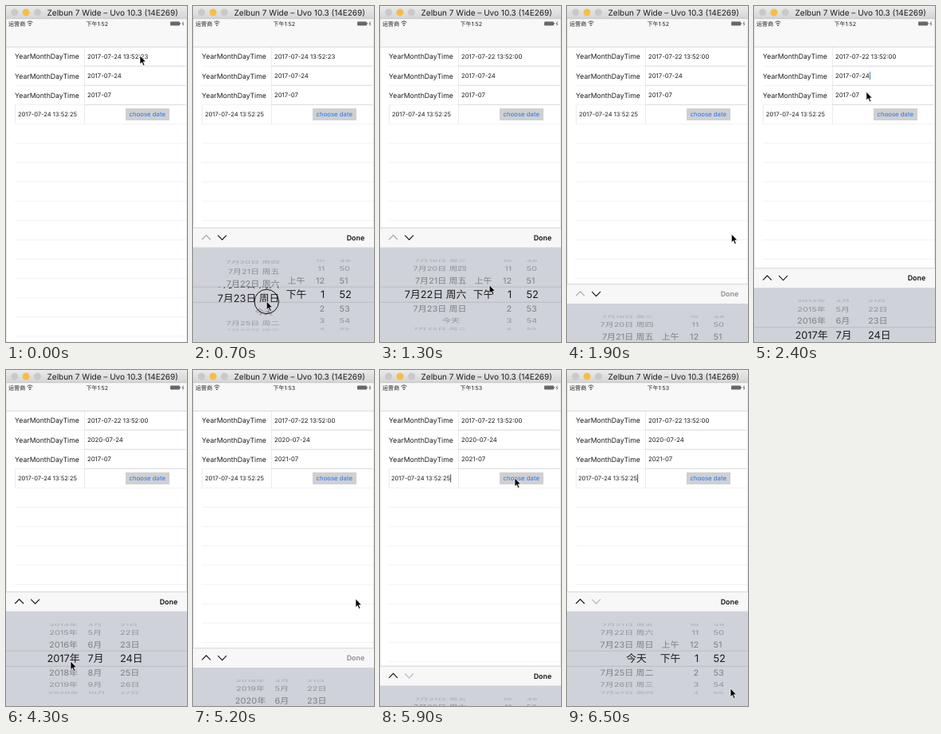
Recreate the animation shown at these times as an HTML page. Size 227 by 420 pixels, loop 6.6 s.

```html
<!DOCTYPE html>
<html lang="zh-CN">
<head>
<meta charset="utf-8">
<title>Date picker</title>
<style>
html, body { margin: 0; width: 100%; height: 100%; overflow: hidden; background: #fff; }
svg { display: block; width: 100vw; height: 100vh; }
text {
  font-family: Inter, "Noto Sans CJK SC", "Noto Sans CJK", sans-serif;
  fill: #1c1c1e; text-rendering: geometricPrecision; white-space: pre;
}
</style>
</head>
<body>
<svg id="stage" viewBox="0 0 227 420">
  <defs>
    <linearGradient id="bar" x2="0" y2="1">
      <stop stop-color="#ebebeb"/><stop offset="1" stop-color="#d4d4d4"/>
    </linearGradient>
    <clipPath id="band"><rect y="351" width="227" height="19.5"/></clipPath>
    <clipPath id="rest">
      <rect y="302" width="227" height="49"/><rect y="370.5" width="227" height="50"/>
    </clipPath>
  </defs>
</svg>
<script>
const LOOP = 6600, STEP = 100, ROW = 24.13, TOP = 51;
const MID = 360.7, RADIUS = 46, PITCH = Math.PI / 8, PANEL = 143;
const stage = document.getElementById('stage');

function add(parent, tag, attrs = {}) {
  const el = document.createElementNS('http://www.w3.org/2000/svg', tag);
  for (const k in attrs) el.setAttribute(k, attrs[k]);
  parent.append(el);
  return el;
}
// Text centred vertically on y by its cap height
function label(parent, str, x, y, size, attrs = {}) {
  const el = add(parent, 'text', { x, y, dy: '.364em', 'font-size': size, ...attrs });
  el.textContent = str;
  return el;
}
const rect = (p, x, y, width, height, fill, more) => add(p, 'rect', { x, y, width, height, fill, ...more });
const path = (p, d, stroke, width = 1) => add(p, 'path', { d, stroke, 'stroke-width': width, fill: 'none' });
const setText = (el, s) => { if (el.textContent !== s) el.textContent = s; };
const show = (el, on) => el.setAttribute('visibility', on ? 'visible' : 'hidden');

// Table
rect(stage, 0, 0, 227, 420, '#fff');
for (let i = 1; i < 16; i++) path(stage, `M11 ${TOP + i * ROW}H227`, '#efeff0', .8);
for (let i = 1; i < 4; i++) path(stage, `M98 ${TOP + i * ROW}H225`, '#d6d6d8', .8);
path(stage, 'M98.5 51V147.5M11.5 124V147.5', '#e6e6e8', .8);
const rowY = i => TOP + (i + .5) * ROW;
for (let i = 0; i < 3; i++) label(stage, 'YearMonthDayTime', 11, rowY(i) + .2, 8.7);
const fields = [0, 1, 2].map(i => label(stage, '', 102, rowY(i), 7.75));
fields.push(label(stage, '2017-07-24 13:52:25', 15, rowY(3), 7.55));
rect(stage, 150, 128, 55, 15, '#d0d0d1');
label(stage, 'choose date', 177.3, 135.4, 7.8, { 'text-anchor': 'middle', style: 'fill:#2877f5' });
const caret = rect(stage, 0, 0, .9, 10, '#3b69e8');

// Navigation and status bars
rect(stage, 0, 16, 227, 35, '#f8f8f8');
path(stage, 'M0 51.2H227', '#c6c6c8', .7);
label(stage, '运营商', 3, 22, 7.1);
path(stage, 'M26.6 20.6Q30 17.4 33.4 20.6M27.9 22.3Q30 20.3 32.1 22.3', '#222', .9);
path(stage, 'M29.2 23.8L30 24.7L30.8 23.8Z', '#222', .8);
const clock = label(stage, '', 114.3, 22, 7.1, { 'text-anchor': 'middle' });
rect(stage, 206, 19.4, 12, 5, '#646a68', { rx: 1 });
rect(stage, 218.4, 21, .8, 2, '#646a68');
path(stage, 'M222.4 19.6L221.2 22.2H222.8L221.6 24.6', '#222', .6);

// Window frame and title bar
rect(stage, 0, 0, 227, 16, 'url(#bar)');
path(stage, 'M0 15.8H227', '#bdbdbd', .6);
path(stage, 'M.25 16V420M226.75 16V420', '#c4c4c4', .5);
['#c9c9c9', '#f9bd45', '#c9c9c9'].forEach((fill, i) =>
  add(stage, 'circle', { cx: 10.8 + i * 14.3, cy: 8, r: 4.5, fill }));
label(stage, 'Zelbun 7 Wide – Uvo 10.3 (14E269)', 133.7, 8.2, 10, { 'text-anchor': 'middle' });

// Keyboard panel
const panel = add(stage, 'g');
rect(panel, 0, 277.3, 227, 24.4, '#f7f7f8');
path(panel, 'M0 277.3H227', '#c3c4c7', .7);
const up = path(panel, 'M11.2 292L16.6 286.5L22 292', '#111', 1.1);
const down = path(panel, 'M31.2 286.6L36.6 292.2L42 286.6', '#111', 1.1);
const done = label(panel, 'Done', 215.2, 289.5, 8.9, { 'text-anchor': 'end', 'font-weight': 600 });
rect(panel, 0, 301.6, 227, 119, '#cfd2d9');

// A wheel keeps a pool of rows, dim outside the band, enlarged within it
function wheel(parent, { x, anchor, text, min = -Infinity, max = Infinity }) {
  const pool = (clip, size) => {
    const g = add(parent, 'g', { 'clip-path': `url(#${clip})` });
    return Array.from({ length: 9 }, () => label(g, '', 0, 0, size, { 'text-anchor': anchor }));
  };
  const dim = pool('rest', 11), bright = pool('band', 12.8);
  return pos => {
    const first = Math.round(pos) - 4;
    for (let n = 0; n < 9; n++) {
      const i = first + n, angle = (i - pos) * PITCH;
      const seen = i >= min && i <= max && Math.abs(angle) < 1.5;
      const s = seen ? text(i) : '', dx = s === '今天' ? -8.5 : 0;
      const y = MID + RADIUS * Math.sin(angle), c = Math.max(0, Math.cos(angle));
      setText(dim[n], s);
      dim[n].setAttribute('transform', `translate(${x + dx} ${y}) scale(1 ${c})`);
      dim[n].setAttribute('opacity', .04 + .44 * c);
      setText(bright[n], s);
      bright[n].setAttribute('transform', `translate(${x + dx} ${y})`);
    }
  };
}
const wrap = (i, n) => (i - 1 + n * 9) % n + 1;
const week = '日一二三四五六';
const dayName = d => d === 24 ? '今天' : `7月${d}日 周${week[(d + 5) % 7]}`;

const timeView = add(panel, 'g'), dateView = add(panel, 'g');
const timeWheels = [
  { x: 108.4, anchor: 'end', text: dayName },
  { x: 129.5, anchor: 'middle', text: i => ['上午', '下午'][i], min: 0, max: 1 },
  { x: 165.3, anchor: 'end', text: i => `${wrap(i, 12)}` },
  { x: 183.4, anchor: 'start', text: i => `${i}` }
].map(w => wheel(timeView, w));
const dateWheels = [
  { x: 72, anchor: 'middle', text: i => `${i}年` },
  { x: 102.5, anchor: 'start', text: i => `${wrap(i, 12)}月` },
  { x: 143, anchor: 'start', text: i => `${wrap(i, 31)}日` }
].map(w => wheel(dateView, w));
path(panel, 'M0 351.2H227M0 370.3H227', '#b0b3b9', .7);

// Pointer
const pointer = add(stage, 'g');
const ring = add(pointer, 'circle', { r: 15.2, cy: .5, fill: 'none', stroke: '#111', 'stroke-width': 1 });
add(pointer, 'path', {
  d: 'M0 0V10.6L2.4 8.4L4.1 12.5L5.9 11.7L4.2 7.8H7.4Z',
  fill: '#000', stroke: '#fff', 'stroke-width': .7
});

// Timeline
const sessions = [{ open: 100, close: 1800 }, { open: 2200, close: 5100 }, { open: 5800, close: LOOP }];
const taps = [100, 2200, 3800, 5800];   // focus of each field in turn
const drags = {
  day: { a: 475, b: 860, from: 24, to: 22 },
  year: { a: 2900, b: 3500, from: 2017, to: 2020 },
  month: { a: 4300, b: 4900, from: 2017, to: 2021 }
};
const stops = [
  { at: 0, until: 200, x: 168, y: 62 },
  { at: 500, x: 92.3, y: 348 },
  { at: 900, until: 1000, x: 92.3, y: 390 },
  { at: 1700, until: 2000, x: 206.3, y: 285 },
  { at: 2200, until: 2300, x: 146, y: 86 },
  { at: 2900, x: 77, y: 372 },
  { at: 3500, x: 78, y: 322 },
  { at: 3800, until: 3900, x: 122, y: 110 },
  { at: 4300, x: 81, y: 364 },
  { at: 4900, x: 82, y: 312 },
  { at: 5100, until: 5300, x: 204, y: 286 },
  { at: 5700, until: 5900, x: 169, y: 135 },
  { at: 6500, x: 205, y: 398 }
];

const part = (t, a, b) => Math.min(1, Math.max(0, (t - a) / (b - a)));
const smooth = f => f * f * (3 - 2 * f);
const settle = f => 1 - (1 - f) ** 1.5;
const mix = (a, b, f) => a + (b - a) * f;
const turn = (d, t) => mix(d.from, d.to, smooth(part(t, d.a, d.b)));

function panelOffset(t) {
  const s = sessions.findLast(s => t >= s.open);
  if (!s) return PANEL;
  return PANEL * (1 - settle(part(t, s.open, s.open + 400)) + settle(part(t, s.close, s.close + 275)));
}
function pointerAt(t) {
  const n = stops.findLastIndex(s => t >= s.at);
  const p = stops[n], q = stops[n + 1] || p;
  const f = p === q ? 0 : smooth(part(t, p.until ?? p.at, q.at));
  return `${mix(p.x, q.x, f)} ${mix(p.y, q.y, f)}`;
}

function draw(t) {
  const { day, year, month } = drags;
  setText(clock, t < 5000 ? '下午1:52' : '下午1:53');
  setText(fields[0], t < day.b ? '2017-07-24 13:52:23' : '2017-07-22 13:52:00');
  setText(fields[1], t < year.b ? '2017-07-24' : '2020-07-24');
  setText(fields[2], t < month.b ? '2017-07' : '2021-07');

  const open = sessions.some(s => t >= s.open && t < s.close);
  const last = taps.findLastIndex(tap => t >= tap);
  fields[3].setAttribute('x', last === 3 ? 14 : 15);
  show(caret, open && (t - taps[last] - 100) % 600 < 400);
  if (open) {
    const el = fields[last];
    caret.setAttribute('x', +el.getAttribute('x') + el.getComputedTextLength() + .2);
    caret.setAttribute('y', rowY(last) - 5);
    caret.setAttribute('fill', last === 3 ? '#333' : '#3b69e8');
  }

  panel.setAttribute('transform', `translate(0 ${panelOffset(t)})`);
  up.setAttribute('stroke', last < 1 ? '#a6a6aa' : '#111');
  down.setAttribute('stroke', last === 3 ? '#b4b4b8' : '#111');
  done.style.fill = open ? '#111' : '#8c8c90';

  const dates = last === 1 || last === 2;
  timeView.setAttribute('display', dates ? 'none' : 'inline');
  dateView.setAttribute('display', dates ? 'inline' : 'none');
  if (dates) [turn(last === 1 ? year : month, t), 7, 24].forEach((p, i) => dateWheels[i](p));
  else [last === 3 ? 24 : turn(day, t), 1, 13, 52].forEach((p, i) => timeWheels[i](p));

  pointer.setAttribute('transform', `translate(${pointerAt(t)})`);
  const dragging = Object.values(drags).some(d => t > d.a && t < d.b);
  show(ring, dragging || taps.includes(t) || sessions.some(s => s.close === t));
}

const start = performance.now();
function tick() {
  const t = (performance.now() - start) % LOOP;
  draw(Math.floor(t / STEP) * STEP);
  requestAnimationFrame(tick);
}
tick();
</script>
</body>
</html>
```
